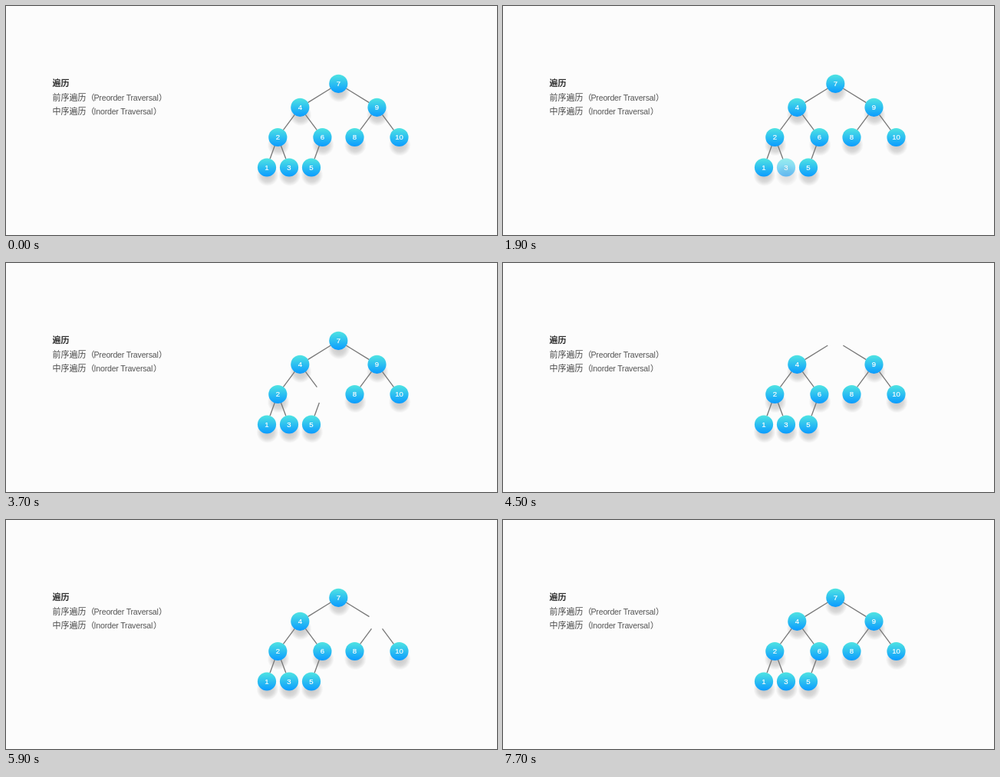
An HTML page that plays this animation: 640x300 px, repeating every 7.9 s.

```html
<!DOCTYPE html>
<html lang="zh-CN">
<head>
<meta charset="utf-8">
<title>遍历</title>
<style>
  html, body { margin: 0; width: 100%; height: 100%; overflow: hidden; background: #fcfcfc; }
  svg { display: block; width: 640px; height: 300px; }
  .copy { font: 300 11px "Noto Sans CJK SC", "Noto Sans CJK", "Noto Sans CJK JP", sans-serif; fill: #484848; }
  .copy .title { font-weight: 700; fill: #303030; }
  .latin { font: 10.6px "Liberation Sans", Arial, sans-serif; letter-spacing: -.2px; fill: #555; }
  #edges { stroke: #777; stroke-width: 1.3; }
  #nodes text { font: 9.6px "Liberation Sans", Arial, sans-serif; fill: #fff; stroke: #fff; stroke-width: .2px; text-anchor: middle; }
</style>
</head>
<body>
<svg viewBox="0 0 640 300">
  <defs>
    <linearGradient id="ball" x2="0" y2="1">
      <stop offset="0" stop-color="#50e4e2"/>
      <stop offset="1" stop-color="#0a9bff"/>
    </linearGradient>
    <radialGradient id="shade">
      <stop offset="0" stop-color="#000" stop-opacity=".22"/>
      <stop offset=".6" stop-color="#000" stop-opacity=".14"/>
      <stop offset="1" stop-color="#000" stop-opacity="0"/>
    </radialGradient>
  </defs>
  <g class="copy">
    <text class="title" x="60.5" y="105">遍历</text>
    <text x="60.5" y="123.5">前序遍历（<tspan class="latin" x="114.5">Preorder Traversal</tspan><tspan x="199">）</tspan></text>
    <text x="60.5" y="142.3">中序遍历（<tspan class="latin" x="114.5">Inorder Traversal</tspan><tspan x="192">）</tspan></text>
  </g>
  <g id="shadows"></g>
  <g id="edges"></g>
  <g id="nodes"></g>
</svg>
<script>
const LOOP = 7900, STEP = 200, FIRST = 100;
const START = 50, PACE = 710;

// Nodes in visiting order: x, y, index of parent
const tree = [
  [340, 211.5, 1], [354.3, 172, 3], [369, 211.5, 1], [383.3, 132.8, 6], [398, 211.5, 5],
  [412.4, 172, 3], [433.3, 101.8, -1], [454.5, 172, 8], [483.5, 132.8, 6], [512.5, 172, 8]
];

function add(parent, tag, attrs, text = "") {
  const el = document.createElementNS("http://www.w3.org/2000/svg", tag);
  for (const key in attrs) el.setAttribute(key, attrs[key]);
  el.textContent = text;
  return document.getElementById(parent)?.appendChild(el) ?? parent.appendChild(el);
}

// Edges stop at the rim of each ball
function addEdge([x1, y1], [x2, y2]) {
  const len = Math.hypot(x2 - x1, y2 - y1);
  const dx = (x2 - x1) / len * 11.8, dy = (y2 - y1) / len * 11.8;
  add("edges", "line", { x1: x1 + dx, y1: y1 + dy, x2: x2 - dx, y2: y2 - dy });
}

const parts = tree.map((node, i) => {
  const [x, y, up] = node;
  if (up >= 0) addEdge(tree[up], node);
  const shadow = add("shadows", "circle", { cx: x + .8, cy: y + 10, r: 14.5, fill: "url(#shade)" });
  const ball = add("nodes", "g", {});
  add(ball, "circle", { cx: x, cy: y, r: 12.1, fill: "url(#ball)" });
  add(ball, "text", { x, y: y + 3.4 }, i + 1);
  return [shadow, ball];
});

const clamp = v => Math.min(1, Math.max(0, v));

// Quick fade out, short pause, slower fade in
function opacity(u) {
  return u < 160 ? clamp(1 - (u - 15) / 60) : clamp((u - 250) / 310);
}

function draw(now) {
  const t = now % LOOP;
  const held = t < FIRST ? 0 : FIRST + Math.floor((t - FIRST) / STEP) * STEP;
  parts.forEach((pair, i) => {
    const o = opacity(held - START - PACE * i);
    for (const el of pair) el.setAttribute("opacity", o);
  });
}

const begin = performance.now();
function tick() {
  draw(performance.now() - begin);
  requestAnimationFrame(tick);
}
tick();
</script>
</body>
</html>
```
